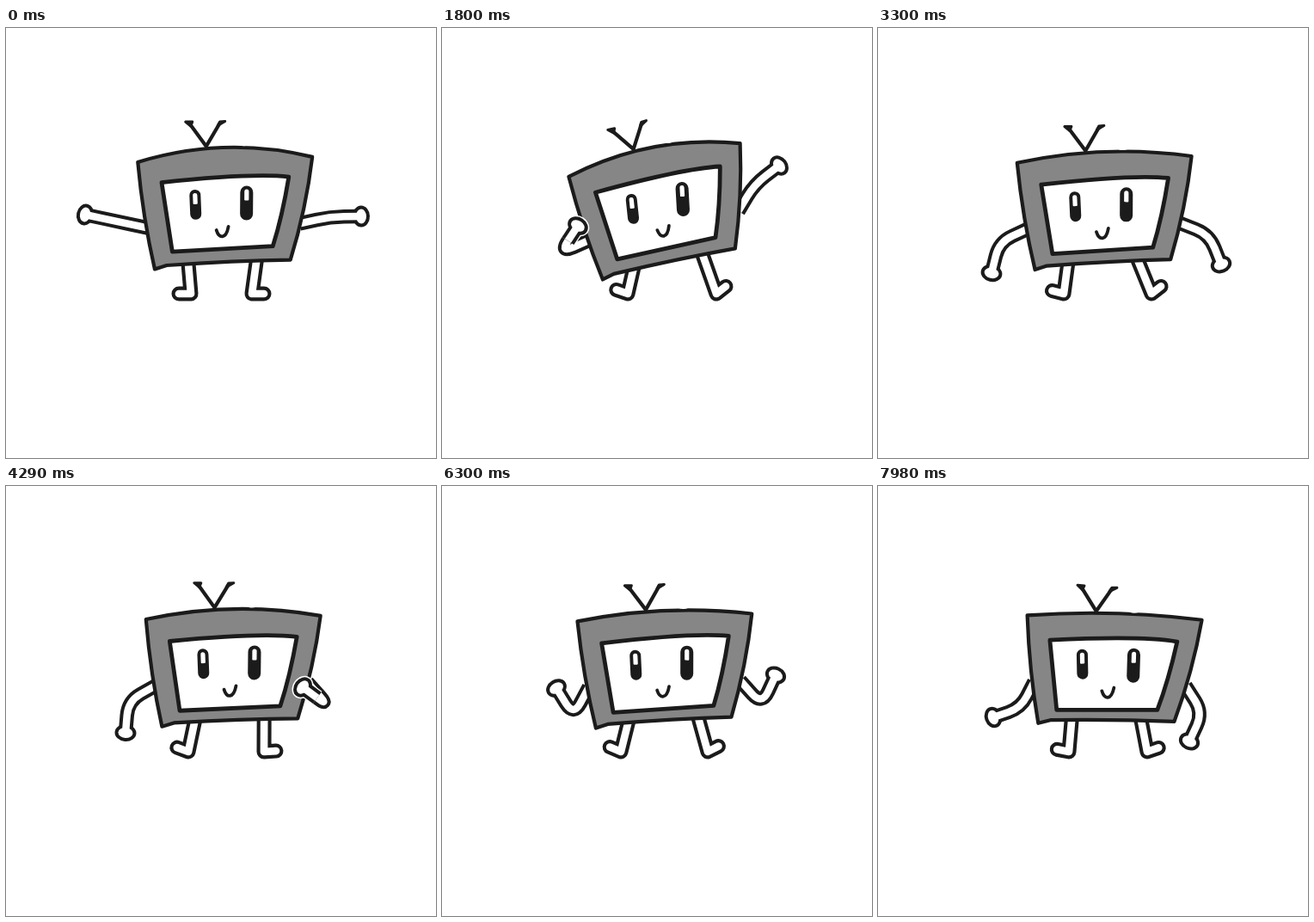
Write an HTML page with a canvas that moves like this. It is 500x500 px and loops after 8000 ms.

```html
<!DOCTYPE html>
<html lang="en">
<head>
<meta charset="utf-8">
<title>Dancing television</title>
<style>
html, body { margin: 0; width: 100%; height: 100%; overflow: hidden; background: #fff; }
canvas { display: block; width: 100%; height: 100%; }
</style>
</head>
<body>
<canvas id="stage" width="500" height="500"></canvas>
<script>
const ctx = document.getElementById('stage').getContext('2d');
const INK = '#1b1b1b', GREY = '#868686', WHITE = '#fff';
const LOOP = 8000, STEP = 30;
const BODY_Y = 213, FLOOR = 309, BONE = 38, REACH = 72, FOOT = 14;

// tilt in degrees; hands as x, y, elbow bend; left before right
const poses = [
  { t: 0,    x: 253, tilt: -1.7, arch: 14, hands: [[92, 217, 0], [413, 219, -0.3]], heels: [215, 286] },
  { t: 1800, x: 255, tilt: -11,  arch: 15, hands: [[158, 230, 1], [392, 160, -0.5]], heels: [216, 319] },
  { t: 3300, x: 262, tilt: -2.2, arch: 9,  hands: [[132, 285, -0.9], [399, 275, -0.9]], heels: [216, 318] },
  { t: 4290, x: 262, tilt: -1.2, arch: 10, hands: [[139, 287, -0.9], [345, 234, -1]], heels: [212, 300] },
  { t: 5070, x: 264, tilt: 0,    arch: 15, hands: [[141, 205, 1], [400, 197, 1]], heels: [222, 308] },
  { t: 6300, x: 258, tilt: -2.5, arch: 8,  hands: [[133, 235, 1], [388, 220, 1]], heels: [208, 309] },
  { t: 7980, x: 270, tilt: 1.5,  arch: 5,  hands: [[134, 269, 0.6], [362, 297, -0.9]], heels: [222, 313] }
];

const mix = (a, b, k) => a + (b - a) * k;
const mixPt = (a, b, k) => a.map((v, i) => mix(v, b[i], k));

function poseAt(t) {
  const i = Math.max(1, poses.findIndex(p => p.t > t));
  const b = poses[t >= LOOP - STEP ? poses.length - 1 : i], a = poses[poses.indexOf(b) - 1];
  const k = Math.min(1, (t - a.t) / (b.t - a.t));
  const e = k * k * (3 - 2 * k);
  return {
    x: mix(a.x, b.x, e),
    tilt: mix(a.tilt, b.tilt, e) * Math.PI / 180,
    arch: mix(a.arch, b.arch, e),
    hands: a.hands.map((h, n) => mixPt(h, b.hands[n], e)),
    heels: mixPt(a.heels, b.heels, e),
    spread: 0.8 * Math.sin(Math.PI * k)
  };
}

function stroke(width, color) {
  ctx.lineWidth = width;
  ctx.strokeStyle = color;
  ctx.stroke();
}

function fill(color) {
  ctx.fillStyle = color;
  ctx.fill();
}

function ellipse(x, y, rx, ry, angle, color) {
  ctx.beginPath();
  ctx.ellipse(x, y, rx, ry, angle, 0, Math.PI * 2);
  fill(color);
}

function polygon(...points) {
  ctx.beginPath();
  points.forEach(p => ctx.lineTo(...p));
  ctx.closePath();
}

function at(x, y, angle, draw) {
  ctx.save();
  ctx.translate(x, y);
  ctx.rotate(angle);
  draw();
  ctx.restore();
}

// the toe lifts as the leg leans outwards
function leg(hip, heelX, side) {
  const lift = Math.max(0, 2 * side * (heelX - hip[0]) + 4) * Math.PI / 180;
  ctx.lineCap = 'round';
  ctx.beginPath();
  ctx.moveTo(...hip);
  ctx.lineTo(heelX, FLOOR);
  ctx.lineTo(heelX + side * FOOT * Math.cos(lift), FLOOR - FOOT * Math.sin(lift));
  stroke(17, INK);
  stroke(8.7, WHITE);
}

// two equal bones; between poses the hand passes through a stretched arm
function solveArm(shoulder, [x, y, bend], side, spread) {
  const out = [shoulder[0] + side * REACH, shoulder[1] - 8];
  const hand = mixPt([x, y], out, spread);
  const dx = hand[0] - shoulder[0], dy = hand[1] - shoulder[1];
  const d = Math.hypot(dx, dy) || 1;
  const off = side * bend * (1 - spread) * Math.sqrt(Math.max(0, BONE * BONE - d * d / 4)) / d;
  const mid = mixPt(shoulder, hand, 0.5);
  return { shoulder, hand, elbow: [mid[0] - dy * off, mid[1] + dx * off], folded: d < 26 };
}

function drawArm({ shoulder, elbow, hand }, forearmOnly) {
  const a = mixPt(shoulder, elbow, 0.55), b = mixPt(elbow, hand, 0.45);
  const angle = Math.atan2(hand[1] - elbow[1], hand[0] - elbow[0]);
  const layer = (width, grow, color) => {
    ctx.beginPath();
    if (!forearmOnly) {
      ctx.moveTo(...shoulder);
      ctx.lineTo(...a);
      ctx.quadraticCurveTo(...elbow, ...b);
    }
    ctx.lineTo(...b);
    ctx.lineTo(...hand);
    stroke(width, color);
    ellipse(...hand, 10 + grow, 12.5 + grow, angle, color);
  };
  ctx.lineCap = 'butt';
  if (forearmOnly) layer(19, 1.5, WHITE);
  layer(16.5, 0, INK);
  layer(8.5, -4, WHITE);
}

function casing(arch) {
  ctx.beginPath();
  ctx.moveTo(-98, -60);
  ctx.quadraticCurveTo(4, -60 - 2 * arch, 105, -60);
  ctx.quadraticCurveTo(96, 0, 76, 59);
  ctx.quadraticCurveTo(10, 58, -68, 61);
  ctx.lineTo(-82, 65);
  ctx.quadraticCurveTo(-94, 5, -98, -60);
  ctx.closePath();
  fill(GREY);
  stroke(4.2, INK);
  ellipse(26, -63 - arch, 6, 2, 0, WHITE);
}

function screen() {
  ctx.beginPath();
  ctx.moveTo(-71, -34);
  ctx.quadraticCurveTo(35, -42, 77, -36);
  ctx.quadraticCurveTo(68, 10, 56, 44);
  ctx.lineTo(-61, 47);
  ctx.closePath();
  fill(WHITE);
  stroke(4.8, INK);
}

function eye(x, y, w, h, angle) {
  at(x, y, angle, () => {
    ctx.beginPath();
    ctx.roundRect(-w / 2, -h / 2, w, h, w / 2);
    fill(INK);
    ctx.beginPath();
    ctx.roundRect(-2.6, 4 - h / 2, 5.2, 13, [2.6, 2.6, 1, 1]);
    fill(WHITE);
  });
}

function mouth(x, y, angle) {
  at(x, y, angle, () => {
    ctx.lineCap = 'round';
    ctx.beginPath();
    ctx.moveTo(-7, -2);
    ctx.bezierCurveTo(-4, 8, 4, 9, 7, -6);
    stroke(3.8, INK);
  });
}

function antenna(x, y, angle) {
  at(x, y, angle, () => {
    ctx.lineCap = 'round';
    ctx.beginPath();
    ctx.moveTo(-19, -26);
    ctx.lineTo(0, 0);
    ctx.lineTo(16, -27);
    stroke(4.2, INK);
    for (const tip of [[[-24, -28.5], [-16, -28.5], [-18, -23.5]], [[13.5, -24], [16, -28.5], [22, -29]]]) {
      polygon(...tip);
      fill(INK);
      stroke(3, INK);
    }
  });
}

function render(t) {
  const { x, tilt, arch, hands, heels, spread } = poseAt(t);
  const cos = Math.cos(tilt), sin = Math.sin(tilt);
  const place = (u, v) => [x + u * cos - v * sin, BODY_Y + u * sin + v * cos];

  ctx.fillStyle = WHITE;
  ctx.fillRect(0, 0, 500, 500);
  ctx.lineJoin = 'round';

  leg(place(-43, 56), heels[0], -1);
  leg(place(37, 56), heels[1], 1);

  const arms = [-1, 1].map((side, i) => solveArm(place(side * 88, 17), hands[i], side, spread));
  arms.forEach(arm => drawArm(arm, false));

  at(x, BODY_Y, tilt, () => {
    casing(arch);
    // the face rides up as the casing arches
    ctx.translate(0, (10 - arch) * 0.4);
    screen();
    eye(-32.5, -7, 13, 35, -0.03 - tilt * 0.6);
    eye(27, -7, 15, 40, 0.02 - tilt * 0.6);
    mouth(-2, 25.5, -tilt * 0.5);
  });
  antenna(...place(-18, -62 - arch), tilt * 1.4 + 0.04);

  arms.filter(arm => arm.folded).forEach(arm => drawArm(arm, true));
}

const start = performance.now();
function tick() {
  const t = (performance.now() - start) % LOOP;
  render(Math.floor(t / STEP) * STEP);
  requestAnimationFrame(tick);
}
tick();
</script>
</body>
</html>
```
